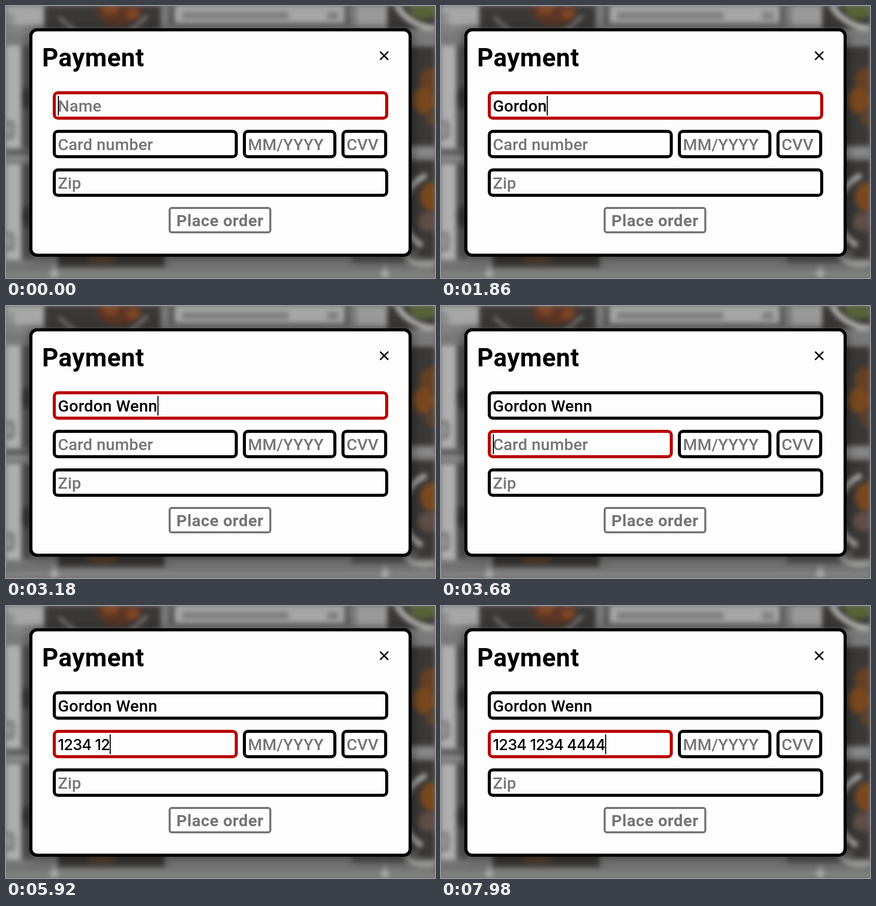
Animation, 844 px wide and 536 px high, one loop 8 s. Source, as an HTML page with a canvas:

```html
<!DOCTYPE html>
<html lang="en">
<head>
<meta charset="utf-8">
<title>Payment form</title>
<style>
  html, body { margin: 0; width: 100%; height: 100%; overflow: hidden; background: #747474; }
  canvas { display: block; width: 844px; height: 536px; }
</style>
</head>
<body>
<canvas id="stage" width="844" height="536"></canvas>
<script>
const W = 844, H = 536, LOOP = 8000, BLINK = 500;
const ctx = document.getElementById('stage').getContext('2d');
const PAPER = '#fdfdfd', INK = '#000', GREY = '#757575', RED = '#b80000';
const FONT = 'Roboto, Inter, sans-serif';
const words = { size: 32, family: FONT, spacing: 0.2 };
const digits = { size: 30, family: 'Inter, Roboto, sans-serif', spacing: -0.9 };

// Key times in ms, one per character
const fields = [
  { x: 92, y: 168, w: 660, hint: 'Name', value: 'Gordon Wenn', style: words, focus: [0, 3400],
    keys: [560, 840, 1040, 1240, 1480, 1700, 2080, 2340, 2700, 2880, 3060] },
  { x: 92, y: 244, w: 364, hint: 'Card number', value: '1234 1234 4444', style: digits, focus: [3400, LOOP],
    keys: [4260, 4480, 4700, 4920, 5260, 5560, 5760, 6060, 6260, 6600, 6900, 7120, 7320, 7540] },
  { x: 466, y: 244, w: 184, hint: 'MM/YYYY' },
  { x: 660, y: 244, w: 90, hint: 'CVV' },
  { x: 92, y: 320, w: 660, hint: 'Zip' }
];

function box(c, x, y, w, h, r, line, stroke, fill) {
  const d = line / 2;
  c.beginPath();
  c.roundRect(x + d, y + d, w - line, h - line, r - d);
  if (fill) { c.fillStyle = fill; c.fill(); }
  c.lineWidth = line;
  c.strokeStyle = stroke;
  c.stroke();
}

function text(c, str, x, y, weight, color, { size, family = FONT, spacing }) {
  c.font = `${weight} ${size}px ${family}`;
  c.letterSpacing = spacing + 'px';
  c.fillStyle = color;
  c.fillText(str, x, y);
}

function rect(c, x, y, w, h, color) {
  c.fillStyle = color;
  c.fillRect(x, y, w, h);
}

function blob(c, x, y, rx, ry, color) {
  c.beginPath();
  c.ellipse(x, y, rx, ry, 0, 0, 7);
  c.fillStyle = color;
  c.fill();
}

function arc(c, x, y, r, from, to, width, color) {
  c.beginPath();
  c.arc(x, y, r, from, to);
  c.lineWidth = width;
  c.strokeStyle = color;
  c.stroke();
}

function menuCards(c) {
  const light = '#a6a6a6', dark = '#3b3937', edge = '#5a5a5a', line = '#929292', food = '#7d4526';
  rect(c, -20, -20, W + 40, H + 40, '#7a7a7a');
  // top row
  rect(c, -20, -20, 94, 58, light);
  rect(c, -20, 14, 36, 24, '#8e8e8e');
  rect(c, 76, -20, 228, 66, dark);
  arc(c, 190, -55, 115, 0.7, 2.4, 5, '#8a8a88');
  blob(c, 222, 8, 44, 30, '#5c3524');
  blob(c, 206, 6, 16, 12, food);
  blob(c, 250, 16, 14, 11, food);
  rect(c, 320, -20, 356, 58, edge);
  rect(c, 332, -20, 334, 54, light);
  rect(c, 346, 12, 210, 14, '#7e7e7e');
  rect(c, 632, 12, 22, 14, '#7e7e7e');
  rect(c, 690, -20, 60, 60, '#999999');
  rect(c, 750, -20, 120, 66, dark);
  arc(c, 845, -45, 88, 1.3, 3.1, 11, '#aeaeac');
  blob(c, 822, 6, 28, 20, '#566238');
  rect(c, -20, 46, W + 40, 4, line);
  // left column
  for (const [y, h] of [[78, 202], [312, 188]]) {
    rect(c, -20, y, 50, h, '#aeaeae');
    rect(c, 30, y, 22, h, '#565656');
    blob(c, 40, y + 104, 9, 22, '#373737');
    box(c, -20, y + h - 54, 36, 36, 6, 5, '#6e6e6e', '#999999');
  }
  rect(c, -20, 284, 70, 9, edge);
  rect(c, -20, 296, 70, 5, '#989898');
  // right column
  rect(c, 792, 80, 72, 195, dark);
  blob(c, 838, 145, 24, 24, '#674023');
  blob(c, 822, 186, 22, 26, '#784820');
  blob(c, 842, 220, 18, 18, '#59402e');
  rect(c, 790, 282, 74, 12, '#8a8a8a');
  rect(c, 792, 304, 72, 194, dark);
  arc(c, 858, 405, 78, 2.1, 4.3, 11, '#a5a5a3');
  blob(c, 838, 376, 23, 28, '#79481f');
  blob(c, 832, 425, 22, 19, '#5f4d48');
  // bottom row
  rect(c, -20, 506, W + 40, 50, '#737373');
  rect(c, 102, 480, 210, 34, dark);
  blob(c, 188, 496, 30, 12, '#58402f');
  rect(c, 330, 480, 336, 32, '#7a7a7a');
  rect(c, 680, 480, 130, 28, edge);
  arc(c, 825, 455, 55, 0.8, 2.4, 9, '#9d9d9b');
  rect(c, -20, 526, W + 40, 5, line);
  for (const x of [95, 746]) {
    rect(c, x - 3, 510, 6, 40, line);
    blob(c, x, 528, 8, 8, '#adadad');
  }
}

function makeScene() {
  const sharp = new OffscreenCanvas(W, H);
  menuCards(sharp.getContext('2d'));
  const scene = new OffscreenCanvas(W, H);
  const c = scene.getContext('2d');
  rect(c, 0, 0, W, H, '#747474');
  c.filter = 'blur(5px)';
  c.drawImage(sharp, 0, 0);
  c.filter = 'none';

  c.save();
  c.shadowColor = 'rgba(0, 0, 0, .55)';
  c.shadowBlur = 22;
  c.shadowOffsetY = 3;
  c.beginPath();
  c.roundRect(46, 44, 752, 450, 15);
  c.fillStyle = INK;
  c.fill();
  c.restore();
  box(c, 46, 44, 752, 450, 15, 6, INK, PAPER);

  text(c, 'Payment', 71, 119, 700, INK, { size: 49.5, spacing: 0.6 });
  c.beginPath();
  c.moveTo(736, 90); c.lineTo(752, 106);
  c.moveTo(752, 90); c.lineTo(736, 106);
  c.lineWidth = 3;
  c.strokeStyle = INK;
  c.stroke();

  box(c, 320, 396, 202, 52, 6, 4, GREY);
  c.textAlign = 'center';
  text(c, 'Place order', 421, 434, 700, GREY, { size: 32, spacing: 0.6 });
  return scene;
}

const scene = makeScene();

function drawField(f, t) {
  const keys = f.keys || [];
  const typed = keys.filter(k => k <= t).length;
  const shown = typed ? f.value.slice(0, typed) : '';
  const active = f.focus && t >= f.focus[0] && t < f.focus[1];
  const left = f.x + 10, base = f.y + 40;

  box(ctx, f.x, f.y, f.w, 56, 10, 6, active ? RED : INK, PAPER);
  text(ctx, shown || f.hint, left, base, 500, shown ? INK : GREY, shown ? f.style : words);
  if (!active) return;

  // The caret restarts its blink on every key
  const since = t - (typed ? keys[typed - 1] : f.focus[0]);
  if (Math.floor(since / BLINK) % 2 === 0) {
    const end = shown ? ctx.measureText(shown).width : 0;
    rect(ctx, Math.round(left + end), f.y + 9, 2, 39, INK);
  }
}

function draw(t) {
  ctx.drawImage(scene, 0, 0);
  for (const f of fields) drawField(f, t);
}

const start = performance.now();
function tick() {
  draw((performance.now() - start) % LOOP);
  requestAnimationFrame(tick);
}
tick();
</script>
</body>
</html>
```
